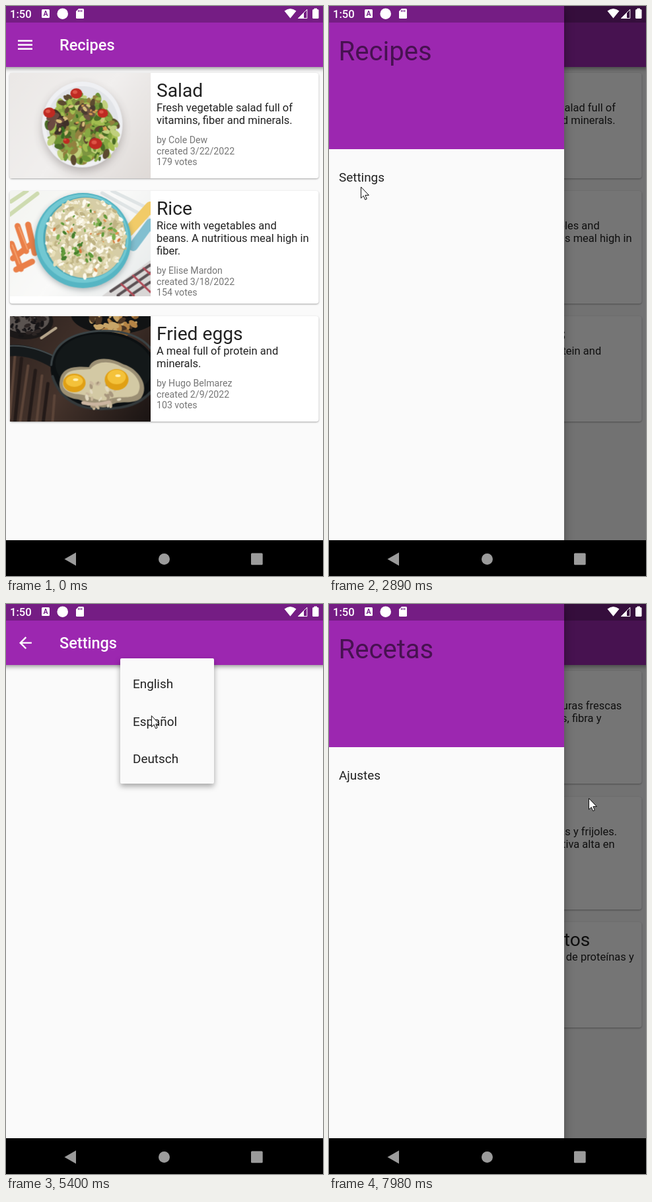
Recreate the animation shown at these times as an HTML page with a canvas. Size 480 by 860 pixels, loop 8000 ms.

```html
<!DOCTYPE html>
<html lang="en">
<head>
<meta charset="utf-8">
<title>Recipe app</title>
<style>
html, body { margin: 0; width: 100%; height: 100%; overflow: hidden; background: #000; }
canvas { display: block; }
</style>
</head>
<body>
<canvas id="stage" width="480" height="860"></canvas>
<script>
const LOOP = 8000, PURPLE = '#9c27b0', INK = 'rgba(0,0,0,.87)', PHOTO_W = 213, PHOTO_H = 159;
let c = document.getElementById('stage').getContext('2d');

const clamp = v => Math.max(0, Math.min(1, v));
const progress = (t, start, length) => clamp((t - start) / length);
const easeOut = p => 1 - (1 - p) ** 3;

// ---------- drawing helpers ----------
function text(str, x, y, size, color = INK, weight = 400) {
  c.font = `${weight} ${size}px Roboto, sans-serif`;
  c.fillStyle = color;
  c.fillText(str, x, y);
}
function rect(x, y, w, h, color, radius = 0) {
  c.fillStyle = color;
  c.beginPath();
  c.roundRect(x, y, w, h, radius);
  c.fill();
}
function oval(x, y, rx, ry, color, angle = 0) {
  c.fillStyle = color;
  c.beginPath();
  c.ellipse(x, y, rx, ry, angle, 0, 7);
  c.fill();
}
function shape(path, color, x = 0, y = 0, scale = 1) {
  c.save();
  c.translate(x, y);
  c.scale(scale, scale);
  c.fillStyle = color;
  c.fill(new Path2D(path));
  c.restore();
}
function line(path, color, width) {
  c.strokeStyle = color;
  c.lineWidth = width;
  c.lineCap = 'round';
  c.stroke(new Path2D(path));
}
function gradient(x0, y0, x1, y1, ...colors) {
  const g = c.createLinearGradient(x0, y0, x1, y1);
  colors.forEach((color, i) => g.addColorStop(i / (colors.length - 1), color));
  return g;
}
function withShadow(color, blur, dy, draw) {
  c.save();
  c.shadowColor = color;
  c.shadowBlur = blur;
  c.shadowOffsetY = dy;
  draw();
  c.restore();
}

// ---------- food pictures ----------
function seeded(seed) {
  return () => (seed = (seed * 16807) % 2147483647) / 2147483647;
}
function scatter(seed, count, x, y, radius, size, colors) {
  const rnd = seeded(seed);
  for (let i = 0; i < count; i++) {
    const a = rnd() * 6.283, d = Math.sqrt(rnd()) * radius;
    const s = size * (.5 + rnd());
    oval(x + Math.cos(a) * d, y + Math.sin(a) * d, s, s * .55,
      colors[Math.floor(rnd() * colors.length)], rnd() * 3);
  }
}
function picture(draw) {
  const screen = c, canvas = document.createElement('canvas');
  canvas.width = PHOTO_W;
  canvas.height = PHOTO_H;
  c = canvas.getContext('2d');
  draw();
  c = screen;
  return canvas;
}
const salad = picture(() => {
  rect(0, 0, PHOTO_W, PHOTO_H, gradient(0, 0, 213, 159, '#ebe8e6', '#f1efee', '#dfdad7'));
  withShadow('rgba(60,50,50,.3)', 14, 6, () => oval(110, 78, 61, 65, '#eff0f3'));
  oval(110, 78, 55, 58, '#e2e4e8');
  oval(110, 84, 51, 46, '#7d9440', .3);
  scatter(41, 210, 110, 84, 53, 6.5, ['#a3bd50', '#6c9336', '#c0d07c', '#4a6b25', '#87a743', '#5c4a30', '#93803f']);
  scatter(9, 14, 72, 76, 14, 7, ['#4d3832', '#6b4a41', '#3f3028']);
  scatter(5, 10, 116, 56, 11, 6, ['#4b3b31', '#6e5242']);
  scatter(77, 34, 112, 80, 38, 3.2, ['#d99f52', '#d8be7c', '#386c22']);
  [[60, 60, 9], [130, 107, 10], [101, 31, 9], [141, 61, 8], [86, 103, 5]].forEach(([x, y, r]) => {
    oval(x, y, r, r * .85, '#bf2a22');
    oval(x - 2, y - 2, r * .4, r * .3, '#dd5546');
  });
});
const rice = picture(() => {
  rect(0, 0, PHOTO_W, PHOTO_H, gradient(0, 0, 213, 159, '#f3f4f0', '#fafaf9', '#e6eaea'));
  line('M0 36 L42 4 M2 16 L26 0', '#cedbb0', 6);
  line('M140 3 L210 42 M155 0 L213 28', '#dfe4e5', 5);
  line('M12 53 L25 91 M3 80 L17 118 M28 51 L38 94 M5 102 L36 78 M10 119 L34 107', '#ea7f48', 9);
  line('M14 55 L27 88 M4 82 L15 110', '#f5a36f', 2);
  line('M180 61 L213 24', '#f1cb68', 16);
  line('M187 84 L213 49', '#82bfd0', 14);
  shape('M140 159 L213 105 V159Z', '#d8d6d5');
  line('M153 152 L213 112 M164 158 L213 124 M183 158 L213 138', '#5b5154', 4);
  line('M169 141 L188 158 M187 128 L213 153 M203 117 L213 126', '#b04a57', 3);
  withShadow('rgba(40,60,70,.35)', 8, 3, () => oval(111, 75, 73, 72, '#56b5c3'));
  oval(111, 72, 69, 67, '#72c8d2');
  oval(114, 71, 63, 62, '#4ba6b4');
  oval(115, 71, 61, 61, '#d6cda6');
  scatter(31, 480, 115, 71, 60, 3.6, ['#f4eed8', '#e8dfba', '#fdfaee', '#bfb384', '#d9cfa0']);
  scatter(18, 46, 112, 66, 48, 3.4, ['#629b3a', '#7cae4d', '#467f2c']);
  scatter(12, 20, 115, 75, 55, 2.6, ['#df9450', '#d9793c']);
});
const eggs = picture(() => {
  rect(0, 0, PHOTO_W, PHOTO_H, gradient(0, 0, 213, 159, '#2b211e', '#46342c', '#1a1413'));
  line('M8 60 L0 154 M28 75 L16 159 M49 90 L41 159 M68 120 L65 159', '#5b4438', 4);
  line('M18 64 L8 159 M39 82 L29 159 M58 102 L51 159', '#231a18', 5);
  oval(24, 8, 42, 27, '#1b1818');
  oval(24, 5, 36, 20, '#5a5350');
  scatter(52, 70, 24, 4, 27, 4, ['#171517', '#2d2625']);
  line('M48 33 L70 18', '#b5a58b', 4);
  oval(159, -2, 66, 29, '#111314');
  scatter(61, 80, 159, -4, 36, 6, ['#8a5f30', '#b58445', '#4a3524', '#c8a568']);
  line('M0 52 Q33 49 69 71', '#15191b', 17);
  line('M0 45 Q33 43 70 62', '#444c4f', 2);
  oval(143, 82, 81, 59, '#0c1012', .08);
  line('M63 74 C66 36 103 23 143 22 C184 22 213 37 221 64', '#3b4447', 3);
  oval(143, 75, 74, 48, '#131819', .08);
  line('M65 91 C76 126 106 142 143 140 C175 140 199 133 218 110', '#33393b', 4);
  shape('M76 97 C80 75 102 76 120 77 C127 60 153 62 173 73 C194 79 213 105 199 124 C187 135 166 126 153 135 C137 144 119 130 104 126 C86 124 72 114 76 97Z', '#9b8f74');
  shape('M81 98 C85 78 104 82 122 80 C133 67 153 67 170 77 C191 84 203 103 194 117 C182 127 166 119 150 126 C133 132 121 119 105 118 C91 117 77 111 81 98Z', '#d3c9a4');
  scatter(23, 26, 142, 120, 26, 4, ['#c9b89b', '#a8977d', '#e2d9c0']);
  line('M111 131 Q130 136 151 130', '#cbb5a0', 5);
  oval(98, 101, 17, 14, '#e0a015');
  oval(162, 96, 18, 16, '#e0a015');
  oval(98, 98, 13, 9, '#f4c23a');
  oval(162, 92, 14, 11, '#f4c23a');
  oval(100, 96, 4, 2, '#fff0b3');
  oval(164, 90, 4, 2, '#fff0b3');
});

// ---------- content ----------
const ENGLISH = {
  app: 'Recipes', settings: 'Settings', language: 'English',
  meta: (who, date, votes) => ['by ' + who, 'created ' + date, votes + ' votes'],
  cards: [
    ['Salad', ['Fresh vegetable salad full of', 'vitamins, fiber and minerals.'], 'Cole Dew', '3/22/2022', 179],
    ['Rice', ['Rice with vegetables and', 'beans. A nutritious meal high in', 'fiber.'], 'Elise Mardon', '3/18/2022', 154],
    ['Fried eggs', ['A meal full of protein and', 'minerals.'], 'Hugo Belmarez', '2/9/2022', 103]
  ]
};
const SPANISH = {
  app: 'Recetas', settings: 'Ajustes', language: 'Español',
  meta: (who, date, votes) => ['por ' + who, 'creado ' + date, votes + ' votos'],
  cards: [
    ['Ensalada', ['Ensalada de verduras frescas', 'llena de vitaminas, fibra y', 'minerales.'], 'Cole Dew', '22/3/2022', 179],
    ['Arroz', ['Arroz con verduras y frijoles.', 'Una comida nutritiva alta en', 'fibra.'], 'Elise Mardon', '18/3/2022', 154],
    ['Huevos fritos', ['Una comida llena de proteínas y', 'minerales.'], 'Hugo Belmarez', '9/2/2022', 103]
  ]
};
const PICTURES = [salad, rice, eggs];
const LANGUAGES = ['English', 'Español', 'Deutsch'];

// ---------- screens ----------
function page(title) {
  rect(0, 0, 480, 860, '#fafafa');
  withShadow('rgba(0,0,0,.45)', 7, 2, () => rect(-10, -10, 500, 102, PURPLE));
  text(title, 81, 67, 23.5, '#fff', 500);
}
function ripple(t, start, x, y) {
  const p = progress(t, start, 300);
  if (p <= 0 || p >= 1) return;
  c.save();
  c.beginPath();
  c.arc(29, 58.5, 29, 0, 7);
  c.clip();
  oval(x, y, 12 + 36 * p, 12 + 36 * p, `rgba(200,200,200,${.35 * (1 - p * p)})`);
  c.restore();
}
function recipeList(lang, t) {
  page(lang.app);
  [52.5, 58.6, 64.7].forEach(y => rect(18, y - 1.25, 22, 2.5, '#fff'));
  ripple(t, 1600, 26, 67);
  let y = 101;
  lang.cards.forEach(([title, lines, who, date, votes], i) => {
    const height = lines.length > 2 ? 170.8 : 159;
    const top = Math.round(y);
    withShadow('rgba(0,0,0,.35)', 2.5, 1, () => rect(5.5, top, 468, Math.floor(height), '#fff', 4));
    c.drawImage(PICTURES[i], 5.5, top, PHOTO_W, PHOTO_H - .5);
    text(title, 228, top + 36, 28.2);
    lines.forEach((str, n) => text(str, 228, top + 58 + 19 * n, 16.5));
    const metaTop = top + 68 + 19 * lines.length;
    lang.meta(who, date, votes).forEach((str, n) =>
      text(str, 228, metaTop + 16.6 * n, 14.15, 'rgba(0,0,0,.54)'));
    y += height + 18.8;
  });
}
function drawer(lang, open) {
  if (open <= 0) return;
  rect(0, 0, 480, 860, `rgba(0,0,0,${.54 * open})`);
  c.save();
  c.translate(356 * (open - 1), 0);
  withShadow('rgba(0,0,0,.35)', 14, 4, () => rect(0, 0, 356, 860, '#fafafa'));
  rect(0, 0, 356, 216, PURPLE);
  text(lang.app, 14.5, 82, 40.1, 'rgba(0,0,0,.54)');
  text(lang.settings, 15, 265, 18.9);
  c.restore();
}
function settingsPage(lang, t) {
  page(lang.settings);
  shape('M20 11H7.83l5.59-5.59L12 4l-8 8 8 8 1.41-1.41L7.83 13H20v-2z', '#fff', 15.3, 44.5, 1.18);
  ripple(t, 7100, 21, 56);
  text(lang.language, 192, 127, 18.9);
  shape('M267 118h12l-6 6z', '#5c5660');
  rect(192, 139, 95, 1, '#ededed');
  languageMenu(t);
}
function languageMenu(t) {
  const alpha = progress(t, 4810, 80) * (1 - progress(t, 5970, 100));
  if (alpha <= 0) return;
  const grow = easeOut(progress(t, 4880, 150));
  const top = 92 - 10 * grow, bottom = 149 + 122 * grow;
  c.save();
  c.globalAlpha = alpha;
  withShadow('rgba(0,0,0,.35)', 9, 4, () => rect(173, top, 142, bottom - top, '#fafafa', 2));
  c.beginPath();
  c.rect(173, top, 142, bottom - top);
  c.clip();
  LANGUAGES.forEach((name, i) => {
    c.globalAlpha = alpha * progress(t, 4880 + 60 * i, 80);
    text(name, 192, 127 + 56.5 * i, 18.9);
  });
  const press = progress(t, 5780, 250);
  if (press > 0) {
    c.globalAlpha = alpha;
    c.beginPath();
    c.rect(173, 149, 142, 56);
    c.clip();
    oval(214, 173, 15 + 90 * press, 15 + 90 * press, 'rgba(0,0,0,.07)');
  }
  c.restore();
}
function statusBar() {
  rect(0, 0, 480, 25, 'rgba(0,0,0,.25)');
  text('1:50', 6, 18, 16.6, '#fff', 500);
  rect(54, 5, 12, 13, '#fff', 1.5);
  text('A', 56.4, 15.3, 10.5, '#75208a', 700);
  oval(85.7, 11.7, 8.3, 8.3, '#fff');
  shape('M110 4H116.5Q118 4 118 5.5V17.5Q118 19 116.5 19H107.5Q106 19 106 17.5V8Z', '#fff');
  [109, 111.5, 114].forEach(x => rect(x, 6, 1.2, 3, '#75208a'));
  shape('M421.5 7.5Q430.5 .5 439.5 7.5L430.5 18.5Z', '#fff');
  line('M442.8 18.2L455.8 5.2V18.2Z', '#fff', 1);
  shape('M442 18.7L451 9.7V18.7Z', '#fff');
  rect(464, 5, 9.5, 14, '#fff', 1.5);
  rect(466.5, 3.5, 4.5, 2, '#fff');
}
function navigationBar() {
  rect(0, 806, 480, 54, '#000');
  shape('M88.5 834.5L106 824.5V844.5Z', '#9b9b9b');
  oval(239.5, 834.5, 8.5, 8.5, '#9b9b9b');
  rect(371, 825.5, 17.7, 17.7, '#9b9b9b', 1.5);
}

// ---------- motion ----------
// time, x, y, and an optional ease-out power for the way there
const POINTER = [
  [40, 423, 850], [810, 211, 325], [1450, 26, 67, 1.5], [2130, 26, 67],
  [2370, 57, 137], [2750, 48, 273, 1.5], [2890, 48, 273], [3190, 36, 252, 1.5],
  [3400, 36, 252], [3600, 48, 263], [3710, 48, 263], [3880, 108, 221],
  [4540, 232, 105, 1.7], [5100, 232, 105], [5460, 219, 173, 1.5], [5600, 219, 173],
  [5640, 207, 169], [5750, 207, 169], [5790, 219, 173], [6000, 219, 173],
  [6180, 217, 180], [6330, 217, 180], [7000, 21, 56, 1.5], [7470, 21, 56],
  [7980, 393, 293, 1.3], [LOOP, 393, 293]
];
function pointer(t) {
  const i = POINTER.findIndex(k => k[0] > t);
  if (i < 1) return;
  const [t0, x0, y0] = POINTER[i - 1], [t1, x1, y1, power = 1] = POINTER[i];
  const p = 1 - (1 - progress(t, t0, t1 - t0)) ** power;
  c.save();
  c.translate(x0 + (x1 - x0) * p + .5, y0 + (y1 - y0) * p + .5);
  const arrow = 'M0 0V16.5L3.8 13L6.3 18.8L8.8 17.7L6.4 12.1H11.5Z';
  shape(arrow, '#fff');
  line(arrow, '#111', 1);
  c.restore();
}
// critically damped spring from 0 to 1, time in seconds
function spring(s) {
  const w = 22.4;
  return s <= 0 ? 0 : 1 - Math.exp(-w * s) * (1 + (w - 1) * s);
}
// the standard (.4, 0, .2, 1) curve, solved by bisection
function fastOutSlowIn(p) {
  let lo = 0, hi = 1;
  for (let i = 0; i < 20; i++) {
    const u = (lo + hi) / 2, x = 1.2 * u * (1 - u) ** 2 + .6 * u * u * (1 - u) + u ** 3;
    if (x < p) lo = u; else hi = u;
  }
  return 3 * lo * lo * (1 - lo) + lo ** 3;
}
function render(t) {
  const lang = t < 5980 ? ENGLISH : SPANISH;
  const pushed = progress(t, 3320, 290) * (1 - progress(t, 7200, 300));
  if (pushed < 1) {
    recipeList(lang, t);
    drawer(lang, spring((t - 1710) / 1000));
  }
  if (pushed > 0) {
    c.save();
    c.globalAlpha = pushed ** 1.7;
    c.translate(0, 201 * (1 - fastOutSlowIn(pushed)));
    settingsPage(lang, t);
    c.restore();
  }
  statusBar();
  navigationBar();
  pointer(t);
}
const begin = performance.now();
function tick() {
  render((performance.now() - begin) % LOOP);
  requestAnimationFrame(tick);
}
tick();
</script>
</body>
</html>
```
